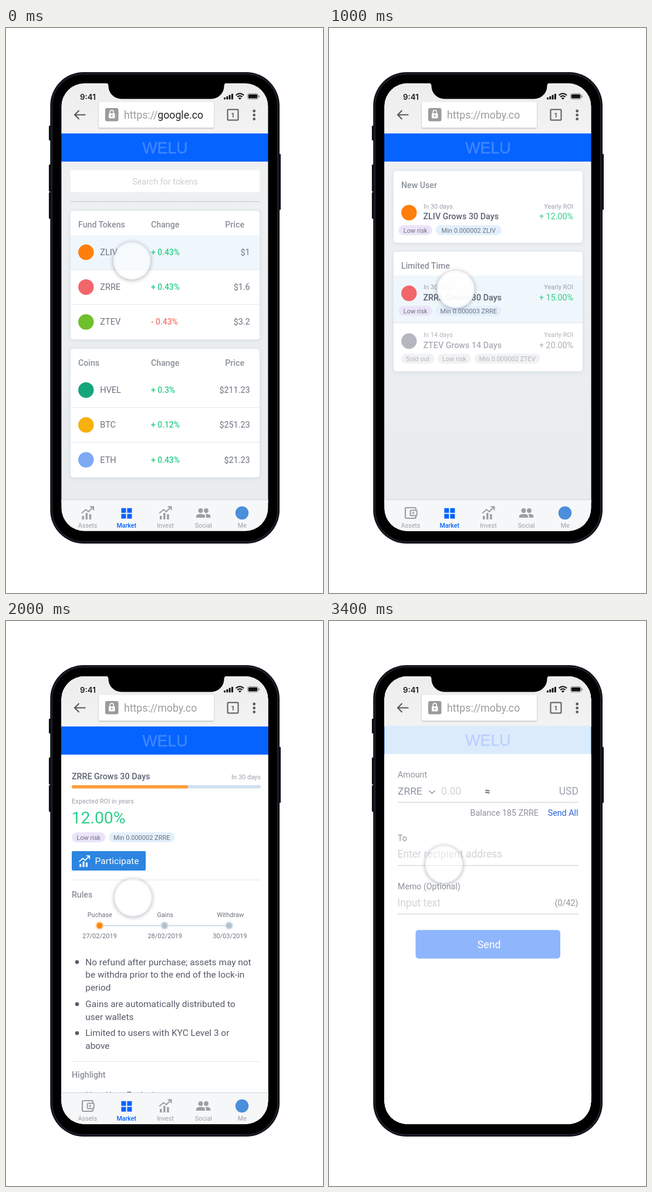
Write an HTML page that moves like this. It is 540x960 px and loops after 3.5 s.

```html
<!DOCTYPE html>
<html lang="en">
<head>
<meta charset="utf-8">
<title>Token app walkthrough</title>
<style>
  html, body { margin: 0; width: 100%; height: 100%; overflow: hidden; background: #fff; }
  #stage { position: absolute; left: 0; top: 0; width: 540px; height: 960px; overflow: hidden; }
  svg { display: block; font-family: Roboto, sans-serif; }
  .card { fill: #fff; filter: drop-shadow(0 1px 3px rgba(110, 160, 190, .24)); }
  .url { fill: #fff; filter: drop-shadow(0 1px 1px rgba(0, 0, 0, .28)); }
  #touch {
    position: absolute; left: -32px; top: -32px; width: 64px; height: 64px; border-radius: 50%;
    box-shadow: 0 1px 6px 1px rgba(50, 55, 80, .32), inset 0 0 4px rgba(90, 95, 115, .16);
  }
</style>
</head>
<body>
<div id="stage">
  <svg id="art" width="540" height="960" viewBox="0 0 540 960"></svg>
  <div id="touch"></div>
</div>
<script>
const GREY = '#8b909a', PALE = '#9aa0aa', SLATE = '#6d7280', DARK = '#5c6273', GREEN = '#2ccf89',
      RED = '#f2786f', HINT = '#d0d3d8', BLUE = '#0563ff';
const COIN = { ZLIV: '#ff7f0a', ZRRE: '#f2666b', ZTEV: '#70bf2c', HVEL: '#13a67c', BTC: '#f6b10c', ETH: '#7da9f5' };

// Drawing helpers
const rect = (x, y, w, h, fill, r = 0, more = '') =>
  `<rect x="${x}" y="${y}" width="${w}" height="${h}" rx="${r}" fill="${fill}" ${more}/>`;
const disc = (x, y, r, fill) => `<circle cx="${x}" cy="${y}" r="${r}" fill="${fill}"/>`;
const path = (d, stroke, width = 2, fill = 'none') =>
  `<path d="${d}" stroke="${stroke}" stroke-width="${width}" fill="${fill}"/>`;
const text = (s, x, y, size, fill, anchor = 'start', weight = 400, more = '') =>
  `<text x="${x}" y="${y}" font-size="${size}" fill="${fill}" text-anchor="${anchor}" font-weight="${weight}" ${more}>${s}</text>`;
const rule = (x, y, w, fill) => rect(x, y - .5, w, 1, fill);
const card = (y, h) => rect(110, y, 322, h, '#fff', 5, 'class="card"');
const heading = (s, x, y, anchor) => text(s, x, y, 14.2, GREY, anchor, 500);

function chartIcon(x, y, color, k = 1) {
  return `<g transform="translate(${x} ${y}) scale(${k})">` +
    rect(1.5, 17, 3.4, 6, color) + rect(7.6, 12, 3.4, 11, color) + rect(13.7, 14, 3.4, 9, color) +
    path('M.7 12.5 7.8 6.2 12.5 9.8 20.3 2M15 1.4h6v6', color, 2) + '</g>';
}

function statusBar() {
  let s = rect(94, 94, 353, 86, 'url(#bar)');
  s += text('9:41', 126, 121.5, 13.3, '#1c1c1e', 'start', 600, 'font-family="Inter, sans-serif"');
  for (let i = 0; i < 4; i++) s += rect(371 + i * 4.3, 118 - i * 2.1, 3, 3.4 + i * 2.1, '#111', .8);
  s += path('M391.5 114.2q6.8-6 13.6 0M394 117q4.3-3.6 8.6 0', '#111', 2) +
    path('M396 119.2q2.3-1.8 4.6 0l-2.3 2.4z', '#111', .4, '#111');
  s += rect(411.5, 111.5, 18, 9.4, 'none', 2.6, 'stroke="#777" stroke-width=".8"') +
    rect(412.8, 112.8, 15.4, 6.8, '#111', 1.5) + rect(430.5, 114.5, 1.4, 3.6, '#777', .7);
  return s;
}

function toolbar(host, hostColor) {
  let s = path('M135.5 147.5H117M124.5 140l-7.5 7.5 7.5 7.5', '#56585c', 2.1);
  s += rect(158, 125.5, 196, 44, '#fff', 2, 'class="url"');
  s += rect(169, 136, 22.5, 22.5, '#9b9b9b', 3) + rect(175, 145, 10.5, 8.6, '#fff', 1) +
    path('M177.2 145v-2.2a3 3 0 0 1 6 0v2.2', '#fff', 1.5) + disc(180.2, 149.2, 1.4, '#9b9b9b');
  s += text(`https://<tspan fill="${hostColor}">${host}</tspan>`, 201, 153.7, 17.7, '#9b9b9b');
  s += rect(377.5, 138.5, 18, 18, 'none', 1, 'stroke="#5b5d61" stroke-width="2"') +
    text('1', 386.4, 151.6, 11, '#5b5d61', 'middle', 600);
  for (const y of [141, 147.8, 154.6]) s += disc(422.7, y, 2.4, '#5b5d61');
  return s;
}

const banner = (y, fill, ink) => rect(94, y, 353, 48.4, fill) +
  text('WELU', 271, y + 34, 26.8, ink, 'middle', 400,
    `font-family="Liberation Sans, Arial, sans-serif" stroke="${ink}" stroke-width=".5"`);

function tabBar(wallet) {
  const off = '#9b9fa5';
  let s = rect(94, 801, 353, 55, '#f6f7f8') + rule(94, 801.5, 353, '#c8dae0');
  s += wallet
    ? rect(130, 815, 18, 18, 'none', 2, `stroke="${off}" stroke-width="2.2"`) +
      rect(138.6, 819.4, 11.2, 9.2, '#f6f7f8', 1.5, `stroke="${off}" stroke-width="2"`) + disc(143.4, 824, 1.8, off)
    : chartIcon(128, 812, off);
  for (const x of [196.4, 206.4]) for (const y of [815.8, 825.6]) s += rect(x, y, 8, 8, BLUE);
  s += chartIcon(260.5, 812, off);
  s += disc(331.5, 820, 3.9, off) + disc(341, 820, 3.9, off) +
    path('M324 832v-2.6q0-3.7 7.5-3.7t7.5 3.7v2.6z', off, 0, off) +
    path('M340.8 832v-2.8q0-1.8-1.5-3.3 9-.6 9 3.5v2.6z', off, 0, off);
  s += disc(402, 824, 11.2, '#4b8edb');
  [['Assets', 139], ['Market', 205.3], ['Invest', 271.5], ['Social', 336.3], ['Me', 402.3]].forEach(([name, x], i) =>
    s += text(name, x, 848.5, 10.7, i === 1 ? BLUE : off, 'middle', i === 1 ? 500 : 400));
  return s;
}

// Market page
function quotes(y, title, rows) {
  let s = heading(title, 123, y + 28.5) + heading('Change', 247, y + 28.5) + heading('Price', 406, y + 28.5, 'end');
  rows.forEach(([name, change, price], i) => {
    const cy = y + 70.2 + i * 59.2;
    if (i) s += rule(110, cy - 29.6, 322, '#e3e7ec');
    s += disc(136.3, cy, 13.2, COIN[name]) + text(name, 160.3, cy + 5, 14.5, SLATE) +
      text(change, 247, cy + 5, 13.9, change[0] === '+' ? GREEN : RED, 'start', 500) +
      text(price, 415.5, cy + 5, 14.3, SLATE, 'end');
  });
  return s;
}

function marketPage() {
  return rect(94, 227, 353, 580, 'url(#back)') +
    rect(110, 241.5, 322, 37.5, '#fff') + text('Search for tokens', 271, 266, 14.3, '#cbced2', 'middle') +
    rule(110, 295, 322, '#bcc9cc') +
    card(310.8, 218.5) + rect(110, 352, 322, 58, '#f0f7fc') +
    quotes(310.8, 'Fund Tokens', [['ZLIV', '+ 0.43%', '$1'], ['ZRRE', '+ 0.43%', '$1.6'], ['ZTEV', '- 0.43%', '$3.2']]) +
    card(545, 218.5) +
    quotes(545, 'Coins', [['HVEL', '+ 0.3%', '$211.23'], ['BTC', '+ 0.12%', '$251.23'], ['ETH', '+ 0.43%', '$21.23']]);
}

// Invest page
const pill = (s, x, y, w, fill, ink = SLATE) =>
  rect(x, y, w, 17, fill, 8.5) + text(s, x + w / 2, y + 12.5, 11, ink, 'middle');
const tags = (x, y, min) => pill('Low risk', x, y, 57.5, '#ebe4f9') + pill(min, x + 63.3, y, 112, '#e3effb');

function plan(cy, name, days, roi, sold) {
  const ink = sold ? '#a9adb5' : DARK, small = sold ? '#b0b4bb' : PALE;
  return disc(136.3, cy, 13.2, sold ? '#b4b7bf' : COIN[name]) +
    text(`In ${days} days`, 161, cy - 7, 11, small) +
    text(`${name} Grows ${days} Days`, 160.5, cy + 11.7, 14.3, ink, 'start', 500) +
    text('Yearly ROI', 416, cy - 7, 11, small, 'end') +
    text(`+ ${roi}%`, 416, cy + 11.7, 14.3, sold ? ink : GREEN, 'end');
}

function investPage() {
  const faint = '#f1f2f4', ink = '#b3b6bd';
  return rect(94, 227, 353, 580, 'url(#back)') +
    card(243, 122) + heading('New User', 123, 271.5) +
    plan(313.7, 'ZLIV', 30, '12.00') + tags(118.5, 335, 'Min 0.000002 ZLIV') +
    card(380, 203.5) + rect(110, 420.5, 322, 80.5, '#eff7fc') + rule(110, 501, 322, '#dfe5eb') +
    heading('Limited Time', 123, 409) +
    plan(450.8, 'ZRRE', 30, '15.00') + tags(118.5, 472.2, 'Min 0.000003 ZRRE') +
    plan(532, 'ZTEV', 14, '20.00', true) +
    pill('Sold out', 123, 553.5, 56.5, faint, ink) + pill('Low risk', 185, 553.5, 57, faint, ink) +
    pill('Min 0.000002 ZTEV', 247.7, 553.5, 112, faint, ink);
}

// Plan details page
function detailPage() {
  let s = rect(94, 227, 353, 580, '#fff') +
    text('ZRRE Grows 30 Days', 112, 268.5, 14.3, DARK, 'start', 500) + text('In 30 days', 434, 268.7, 11, PALE, 'end') +
    rect(112, 279, 322, 5.5, '#cfdfef', 2.75) + rect(112, 279, 198, 5.5, '#ff9d3c', 2.75) +
    text('Expected ROI in years', 112, 310.3, 11, PALE) + text('12.00%', 111.5, 344, 28.4, GREEN) +
    tags(112, 359, 'Min 0.000002 ZRRE') +
    rect(112, 391, 126, 33, '#2c85e0', 2) + chartIcon(124, 398, '#fff', .87) + text('Participate', 151.5, 413.3, 15.5, '#fff') +
    rule(112, 440, 321, '#e2e5e9') + heading('Rules', 112, 470) +
    rect(160, 516.5, 220, 2, '#cbdde5');
  [['Puchase', '27/02/2019', 159.5], ['Gains', '28/02/2019', 270], ['Withdraw', '30/03/2019', 380]].forEach(([name, date, x], i) => {
    s += disc(x, 517.5, 7, i ? '#dbe3ea' : '#ffcf9f') + disc(x, 517.5, 4.8, i ? '#b4c1cc' : '#fb850c') +
      text(name, x + (i ? i * 1.1 : .3), 503, 11, SLATE, 'middle') + text(date, x + i * .7, 539, 11, SLATE, 'middle');
  });
  [['No refund after purchase; assets may not', 584.5, 1], ['be withdra prior to the end of the lock-in', 606.3], ['period', 628],
   ['Gains are automatically distributed to', 656, 1], ['user wallets', 678],
   ['Limited to users with KYC Level 3 or', 705.3, 1], ['above', 727], ['New User Exclusive', 810.5, 1]].forEach(([line, y, dot]) => {
    if (dot) s += disc(121, y - 5, 3.2, '#555a67');
    s += text(line, 135.3, y, 15.4, '#555a67');
  });
  return s + rule(112, 748.5, 321, '#e2e5e9') + heading('Highlight', 112, 776.3);
}

// Transfer page
function sendPage() {
  const line = y => rule(117, y, 308, '#c9cccf');
  const label = (s, y) => text(s, 117, y, 14.2, '#8f939b');
  const hint = (s, x, y) => text(s, x, y, 17.5, HINT);
  return rect(94, 226, 353, 630, '#fff') +
    label('Amount', 266) + text('ZRRE', 117, 295, 17.4, '#8e94a5') + path('M170.5 288l5 5 5-5', '#8e94a5', 1.5) +
    hint('0.00', 191, 295) + text('≈', 270, 295, 16.5, '#3c3f46', 'middle') + text('USD', 425, 295, 17.5, '#9ca1ad', 'end') + line(308) +
    text('Balance 185 ZRRE', 357, 331, 14.3, '#8f939b', 'end') + text('Send All', 424.5, 331, 14.3, '#2a62d8', 'end') +
    label('To', 373.7) + hint('Enter recipient address', 116.5, 402) + line(415.5) +
    label('Memo (Optional)', 456) + hint('Input text', 116.5, 484.7) + text('(0/42)', 424.5, 483.5, 14.3, '#8f939b', 'end') + line(498) +
    rect(147.5, 525, 246.5, 48.5, '#8fb6fd', 5) + text('Send', 272.7, 556, 17.8, '#fff', 'middle');
}

const moby = toolbar('moby.co', '#9b9b9b'), blueBanner = banner(179.2, BLUE, '#3f86ff');
const pages = [
  toolbar('google.co', '#27282b') + blueBanner + marketPage() + tabBar(false),
  moby + blueBanner + investPage() + tabBar(true),
  moby + blueBanner + detailPage() + tabBar(true),
  moby + banner(178, '#dcebfb', '#bbd0ff') + sendPage()
];

const sideKeys = [[73, 166, 25], [73, 232, 46], [73, 279, 45], [463.5, 214, 95]]
  .map(([x, y, h]) => rect(x, y, 4.5, h, '#0f1118', 1.2)).join('');
const notch = '<path d="M169.5 93.5q5 0 5 5a22 22 0 0 0 22 22h153a22 22 0 0 0 22-22q0-5 5-5z" fill="#000"/>';

document.getElementById('art').innerHTML = `
  <defs>
    <clipPath id="screen"><rect x="94.4" y="94" width="352" height="760.8" rx="39"/></clipPath>
    <linearGradient id="bar" x2="0" y2="1"><stop stop-color="#ededee"/><stop offset="1" stop-color="#f3f3f4"/></linearGradient>
    <linearGradient id="back" x2="0" y2="1"><stop stop-color="#eef0f1"/><stop offset="1" stop-color="#e9ecee"/></linearGradient>
  </defs>
  ${sideKeys}
  ${rect(75.3, 75, 390.7, 801, '#0e1017', 57)}
  ${rect(77.3, 77, 386.7, 797, '#20232d', 55)}
  ${rect(79.3, 79, 382.7, 793, '#000', 53)}
  <g clip-path="url(#screen)">
    ${pages.map(p => `<g class="page">${statusBar()}${p}</g>`).join('')}
  </g>
  ${notch}`;

// Timeline
const LOOP = 3500, STEP = 100, FADE = 200;
const pageStarts = [-FADE, 300, 1800, 3000];
const touchPath = [[0, 214.5, 395.5], [700, 214.5, 395.5], [1200, 216.5, 470], [2100, 216.5, 470], [2700, 196, 413.5], [LOOP, 196, 413.5]];

const layers = [...document.querySelectorAll('.page')];
const touch = document.getElementById('touch');
const clamp = v => Math.max(0, Math.min(1, v));
const ease = p => p * p * (3 - 2 * p);

// The finger mark is see-through at rest and turns solid on the way.
function touchAt(t) {
  const i = touchPath.findIndex(k => k[0] > t);
  const [t0, x0, y0] = touchPath[i - 1], [t1, x1, y1] = touchPath[i];
  const raw = (t - t0) / (t1 - t0), p = ease(raw);
  const speed = y0 === y1 ? 0 : 4 * raw * (1 - raw);
  return [x0 + (x1 - x0) * p, y0 + (y1 - y0) * p, .45 + .5 * speed];
}

function draw(t) {
  layers.forEach((layer, i) => {
    const shown = clamp((t - pageStarts[i]) / FADE);
    layer.style.opacity = shown;
    layer.style.display = shown ? '' : 'none';
  });
  const [x, y, alpha] = touchAt(t);
  touch.style.transform = `translate(${x}px, ${y}px)`;
  touch.style.background = `rgba(255, 255, 255, ${alpha})`;
}

const begin = performance.now();
function tick() {
  const t = (performance.now() - begin) % LOOP;
  draw(Math.floor(t / STEP) * STEP);
  requestAnimationFrame(tick);
}
tick();
</script>
</body>
</html>
```
